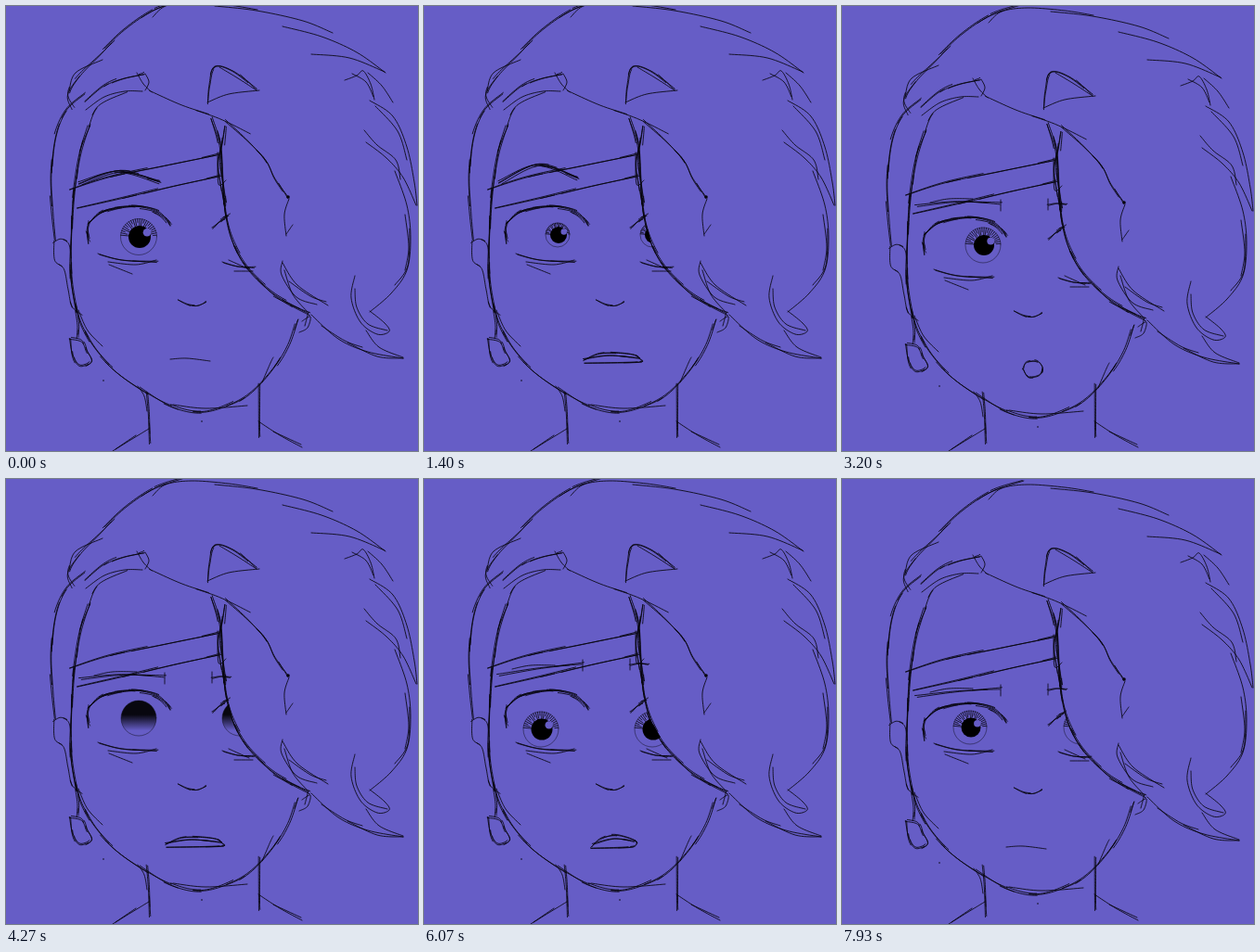
An HTML page with a canvas for the animation above (8000 ms loop, 444x480 px).

```html
<!DOCTYPE html>
<html lang="en">
<head>
<meta charset="utf-8">
<title>Sketched portrait</title>
<style>
  html, body { margin: 0; width: 100%; height: 100%; overflow: hidden; background: #665dc6; }
  canvas { display: block; width: 444px; height: 480px; }
</style>
</head>
<body>
<canvas id="stage" width="444" height="480"></canvas>
<script>
const ctx = document.getElementById('stage').getContext('2d');
const SKIN = '#665dc6', INK = '#08070f';
const LOOP = 8000, STEP = 1000 / 15;

const parse = text => text.split(' ').map(p => p.split(',').map(Number));

// Catmull-Rom samples through the given points
function smooth(points, per = 10) {
  const out = [], at = i => points[Math.max(0, Math.min(points.length - 1, i))];
  for (let i = 0; i < points.length - 1; i++) {
    const [a, b, c, d] = [at(i - 1), at(i), at(i + 1), at(i + 2)];
    for (let k = 0; k < per; k++) {
      const u = k / per;
      out.push([0, 1].map(n => b[n] + u / 2 * (c[n] - a[n] +
        u * (2 * a[n] - 5 * b[n] + 4 * c[n] - d[n] + u * (3 * (b[n] - c[n]) + d[n] - a[n])))));
    }
  }
  out.push(points[points.length - 1]);
  return out;
}

// A line built from overlapping pencil strokes; spread 0 gives one clean line
function pencil(source, passes = 1, spread = 0) {
  const points = typeof source === 'string' ? parse(source) : source;
  const line = smooth(points), path = new Path2D();
  let seed = points.length * 31 + passes * 7;
  const random = () => (seed = (seed * 16807 + 11) % 2147483647) / 2147483647;
  const wobble = () => (random() - 0.5) * 2 * spread;
  for (let i = 0; i < 4; i++) random();
  for (let pass = 0; pass < passes; pass++) {
    for (let start = 0; start < line.length - 1;) {
      const end = spread ? Math.min(line.length - 1, start + 8 + Math.floor(random() * 16)) : line.length - 1;
      const from = spread ? Math.max(0, start - 3) : 0;
      const [ax, ay, bx, by] = [wobble(), wobble(), wobble(), wobble()];
      for (let i = from; i <= end; i++) {
        const u = (i - from) / (end - from);
        path[i === from ? 'moveTo' : 'lineTo'](line[i][0] + ax + (bx - ax) * u, line[i][1] + ay + (by - ay) * u);
      }
      start = end;
    }
  }
  return path;
}

const group = (passes, spread, ...lines) => lines.map(l => pencil(l, passes, spread));

const head = [
  // crown
  ...group(2, 1.8, '72,110 67,95 78,76 100,53 128,25 160,3 195,-9', '84,103 105,86 125,78 150,73'),
  ...group(1, 0, '158,12 172,0 200,-4 240,-1 271,4', '225,0 270,5 320,16 352,29',
    '298,22 340,33 378,50 409,72', '329,52 370,56 408,71', '68,92 75,72 104,58',
    '141,72 148,84 157,93', '150,73 154,82 150,91', '86,112 106,98 128,92 147,92'),
  // right side of the hair
  ...group(1, 0, '365,80 378,75 385,70 393,84 397,101', '390,72 405,86 417,104',
    '373,73 388,82 396,98', '392,102 417,119 432,152 440,190 443,215',
    '386,134 400,150 420,166 425,187', '388,147 410,164 428,185 442,215',
    '398,108 422,135 432,166', '419,178 432,215 436,250 432,285 415,310 392,330',
    '430,225 434,260 430,285', '435,240 433,280 419,301'),
  ...group(1, 0, '376,291 372,315 382,341 400,354 413,351 408,342 392,329',
    '376,305 378,325 390,343 411,350', '329,333 358,359 390,373 428,380',
    '340,345 365,361 384,368', '388,350 402,368 428,379', '368,363 400,378 428,380'),
  // flap and clip
  ...group(1, 0, '298,275 297,290 313,314 335,322', '298,277 314,301 347,323',
    '300,285 309,311 325,330', '305,297 328,313 345,319', '305,208 300,225 302,248',
    '309,236 302,246', '217,104 240,95 273,91', '230,66 250,78 270,91'),
  ...group(2, 1.4, '217,105 219,85 225,65 245,70 270,89'),
  // parting and fringe
  ...group(1, 1.2, '155,92 190,108 230,122 263,138'),
  ...group(2, 1.5, '236,124 260,145 280,166 290,186 304,206'),
  ...group(3, 1.8, '221,121 230,150 233,190 237,225 245,255 262,285 290,312 326,332'),
  ...group(3, 2, '237,130 234,150 230,170 233,195 236,215'),
  ...group(2, 1.2, '68,198 112,184 170,172 230,160', '76,218 125,207 180,194 232,183'),
  ...group(1, 0, '228,158 229,192 237,188'),
  // left side, ear and earring
  ...group(2, 1.8, '85,95 65,112 53,140 48,180 50,220 53,252'),
  ...group(3, 1.8, '89,128 80,160 74,200 71,240 70,290 76,330'),
  ...group(1, 1, '89,130 100,107 130,93', '51,256 59,252 68,257 70,272', '51,254 52,275 62,284 67,305 72,325 82,334'),
  ...group(2, 1.5, '76,330 78,345 77,358', '69,358 82,361 87,372 92,383 80,388 72,378 69,358'),
  // jaw
  ...group(2, 1.6, '76,322 82,345 97,371 120,395 150,416 180,432 210,438 240,430 265,416 290,390 305,365 314,338'),
  ...group(1, 0, '78,328 88,350 104,367', '142,410 149,421 152,437', '180,430 215,434 260,431',
    '276,406 285,385 288,379', '319,340 328,335 325,347 316,352', '326,330 322,345'),
];

const body = [
  ...group(2, 1, '152,417 154,440 155,472', '273,408 273,440 273,465'),
  ...group(1, 0, '154,456 136,467 115,480', '118,478 140,463', '272,448 295,463 319,476', '288,459 318,473'),
];

const lashes = [
  ...group(4, 2, '90,234 102,223 120,218 140,217 160,221 171,228 177,236'),
  ...group(3, 2, '90,233 87,242 89,255'),
  ...group(3, 2, '223,240 231,231 240,225'),
];
const lowerLids = [
  ...group(2, 1.2, '100,268 125,274 163,276', '234,277 250,281 268,282'),
  ...group(1, 0, '110,276 140,279 162,274', '111,279 136,289', '246,286 266,286', '240,274 262,284'),
];
const squint = [
  ...group(5, 2.2, '89,282 115,284 140,288 168,299'),
  ...group(1, 0, '90,276 120,286 160,295', '94,288 118,280', '108,292 140,296', '110,297 142,300',
    '109,301 128,305', '226,266 231,265 238,256', '229,270 237,260', '245,302 256,295', '246,311 256,306'),
  ...group(5, 1.5, '237,294 243,291 249,290'),
];
const nose = group(2, 0.8, '185,317 196,322 206,323 216,319');

const mouths = {
  line: group(1, 0, '177,381 195,380 220,383'),
  gape: group(2, 0.7, '181,388 184,379 198,370 215,369 225,379 227,388 205,389 181,388'),
  part: group(2, 0.8, '180,385 190,376 206,372 226,377 229,382 220,385 180,386', '182,382 205,376 227,379'),
  wide: group(2, 0.6, '172,382 188,375 205,374 226,376 233,381 230,384 173,385', '172,381 200,377 232,380'),
  grin: group(2, 0.6, '176,381 195,376 215,375 231,379 225,385 178,384'),
  ooh: group(2, 0.9, '195,379 199,372 210,371 216,378 213,386 201,388 195,379'),
  tall: group(2, 0.9, '194,379 199,370 210,370 217,379 212,389 200,389 194,379'),
};
const speech = [
  [0, 'line'], [267, 'gape'], [933, 'wide'], [1667, 'part'], [1733, 'ooh'], [1867, 'wide'], [1933, 'line'],
  [2800, 'ooh'], [3333, 'line'], [3467, 'part'], [3667, 'wide'], [4400, 'ooh'], [4533, 'part'],
  [4933, 'wide'], [5200, 'ooh'], [5400, 'part'], [6200, 'ooh'], [6400, 'wide'],
  [6933, 'grin'], [7200, 'line'], [7400, 'tall'], [7667, 'line'],
];

// Offsets: head, nose, lips, lash, lower lid. Eyes: left x, right x, y, iris, pupil.
// Brow: outer x, then y at the outer end, middle and inner end.
const calm = [0, 0, 0, 0, 0, 144, 246, 247, 13, 9, 82, 190, 171, 186];
const aside = [6, 12, 12, 12, 17, 152, 264, 258, 19, 11, 80, 216, 211, 213];
const ahead = [6, 12, 12, 12, 17, 143, 252, 258, 19, 11, 80, 216, 211, 213];
const left = [6, 12, 12, 12, 17, 126, 246, 270, 19, 11.5, 80, 212, 204, 199];
const low = [10, 16, 16, 18, 18, 138, 257, 267, 18, 11, 80, 226, 219, 216];
const stare = [0, 0, 0, 0, 0, 143, 264, 249, 19.5, 12, 80, 191, 178, 190];
const wince = [11, 24, 14, 28, 24, 144, 246, 270, 13, 9, 97, 250, 262, 277];
const poses = [
  [0, stare], [533, wince], [600, wince],
  [733, [2, 6, 4, 8, 6, 144, 246, 253, 13, 9, 90, 212, 205, 218]],
  [867, [2, 6, 4, 8, 6, 144, 246, 253, 13, 9, 90, 212, 205, 218]],
  [1400, calm], [2333, calm], [3200, aside], [3267, aside], [3733, ahead], [4867, ahead],
  [5733, left], [6080, left], [6600, low], [7800, low],
  [7933, [10, 16, 16, 26, 18, 138, 257, 268, 18, 10.5, 80, 235, 229, 226]], [8000, low],
];

function poseAt(t) {
  const i = poses.findIndex(([time]) => time > t);
  const [t0, a] = poses[i - 1], [t1, b] = poses[i];
  const u = (t - t0) / (t1 - t0), ease = u * u * (3 - 2 * u);
  return a.map((v, k) => v + (b[k] - v) * ease);
}

function draw(paths, dy = 0, width = 0.85) {
  ctx.save();
  ctx.translate(0, dy);
  ctx.lineWidth = width;
  paths.forEach(p => ctx.stroke(p));
  ctx.restore();
}

function disc(x, y, r, fill) {
  ctx.beginPath();
  ctx.arc(x, y, r, 0, Math.PI * 2);
  if (fill) { ctx.fillStyle = fill; ctx.fill(); } else ctx.stroke();
}

function eye(x, y, iris, pupil, dark) {
  ctx.lineWidth = 0.45;
  disc(x, y, iris);
  if (dark) {
    const shade = ctx.createLinearGradient(0, y - iris, 0, y + iris);
    shade.addColorStop(0, INK);
    shade.addColorStop(0.4, INK);
    shade.addColorStop(0.85, 'rgba(8,7,15,0)');
    disc(x, y, iris, shade);
    return;
  }
  ctx.lineWidth = 0.8;
  ctx.beginPath();
  for (let k = 0; k < 24; k++) {
    const angle = Math.PI * (1.03 + 0.94 * k / 23), inner = pupil * (0.8 + 0.25 * (k % 3));
    ctx.moveTo(x + Math.cos(angle) * iris, y + Math.sin(angle) * iris);
    ctx.lineTo(x + Math.cos(angle) * inner, y + Math.sin(angle) * inner);
  }
  ctx.stroke();
  disc(x + 1, y, pupil, '#000');
  disc(x + pupil * 0.75, y - pupil * 0.4, pupil * 0.36, SKIN);
}

function rightEye(headY, ...args) {
  ctx.save();
  ctx.beginPath();
  parse('0,121 221,121 233,190 237,225 245,255 262,285 290,312 0,312')
    .forEach(([x, y]) => ctx.lineTo(x, y + headY));
  ctx.clip();
  eye(...args);
  ctx.restore();
}

function brows(t, outerX, outer, middle, inner) {
  const flat = t >= 2800, shut = t >= 267 && t < 1000;
  const innerX = flat || shut ? 171 : 166;
  const line = [[outerX, outer], [(outerX + innerX) / 2, middle], [innerX, inner]];
  draw([pencil(line, flat ? 2 : 4, flat ? 1.8 : 2.2)]);
  if (shut) draw([pencil([[innerX - 1, inner - 14], [innerX + 1, inner - 4], [innerX, inner + 3]])]);
  if (!flat) return;
  draw([
    pencil([[innerX, inner - 4], [innerX, inner + 8]]),
    pencil([[95, middle + 1], [115, middle - 3], [141, middle - 3]]),
    pencil([[222, inner - 5], [222, inner + 7]]),
    pencil([[222, inner + 2], [232, inner], [242, inner + 1]], 2, 1),
  ]);
}

function render(t) {
  const [headY, noseY, lipsY, lashY, lowerY, leftX, rightX, eyeY, iris, pupil, ...brow] = poseAt(t);
  ctx.fillStyle = SKIN;
  ctx.fillRect(0, 0, 444, 480);
  ctx.strokeStyle = INK;
  ctx.lineCap = ctx.lineJoin = 'round';

  draw(body);
  draw(head, headY);
  disc(105, 404 + headY, 0.8, INK);
  disc(211, 448 + headY, 0.8, INK);
  disc(304, 206 + headY, 1.8, INK);

  if (t >= 333 && t < 933) {
    draw(squint, lashY - 28);
  } else {
    const dark = t >= 3933 && t < 4600;
    eye(leftX, eyeY, iris, pupil, dark);
    rightEye(headY, rightX, eyeY, iris, pupil, dark);
    draw(lashes, lashY);
    draw(lowerLids, lowerY);
  }
  brows(t, ...brow);
  draw(nose, noseY);
  draw(mouths[speech.filter(([time]) => time <= t + 1).pop()[1]], lipsY);
}

function tick(now) {
  render(Math.floor((now % LOOP) / STEP + 0.05) * STEP % LOOP);
  requestAnimationFrame(tick);
}
requestAnimationFrame(tick);
</script>
</body>
</html>
```
